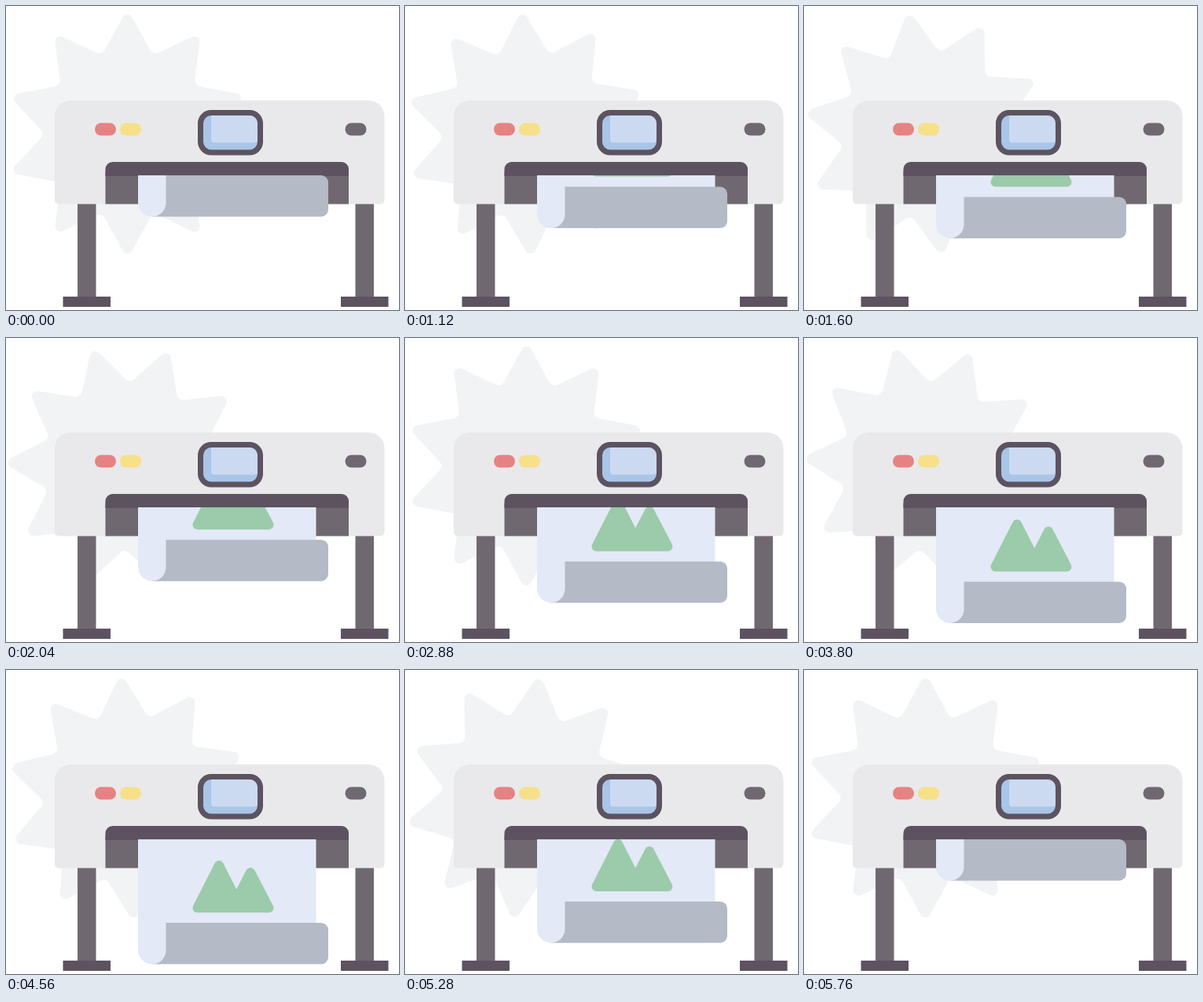
Animation of 500x386 px, one loop 5800 ms. Source, as an HTML page with a canvas:

```html
<!DOCTYPE html>
<html lang="en">
<head>
<meta charset="utf-8">
<title>Plotter</title>
<style>
  html, body { margin: 0; width: 100%; height: 100%; overflow: hidden; background: #fff; }
  canvas { display: block; }
</style>
</head>
<body>
<canvas id="stage" width="500" height="386"></canvas>
<script>
const ctx = document.getElementById('stage').getContext('2d');
const LOOP = 5800, TURN = 5760;
const RISE = 4833, DROP_START = 5140, DROP = 420, TRAVEL = 107;
const DARK = '#5d5360', GREY = '#706870', SHEET = '#e3e9f6';

function box(color, left, top, right, bottom, radii = 0) {
  ctx.fillStyle = color;
  ctx.beginPath();
  ctx.roundRect(left, top, right - left, bottom - top, radii);
  ctx.fill();
}

// Filled polygon with rounded corners; each point is [x, y, radius].
function roundedPoly(color, points) {
  const [a, b] = [points[points.length - 1], points[0]];
  ctx.fillStyle = color;
  ctx.beginPath();
  ctx.moveTo((a[0] + b[0]) / 2, (a[1] + b[1]) / 2);
  points.forEach(([x, y, r], i) => {
    const next = points[(i + 1) % points.length];
    ctx.arcTo(x, y, next[0], next[1], r);
  });
  ctx.closePath();
  ctx.fill();
}

const star = Array.from({ length: 20 }, (_, i) => {
  const angle = i * Math.PI / 10;
  const [dist, r] = i % 2 ? [105, 8] : [159.2, 7];
  return [dist * Math.sin(angle), -dist * Math.cos(angle), r];
});

const hills = [
  [233.7, 202, 6], [271, 128.8, 6], [293.2, 172.4, 0], [311, 138, 6], [344.3, 202, 6]
];

const clamp = v => Math.min(1, Math.max(0, v));
const ease = v => v * v * (3 - 2 * v);

function feed(t) {
  return TRAVEL * (ease(clamp(t / RISE)) - ease(clamp((t - DROP_START) / DROP)));
}

function drawStar(t) {
  ctx.save();
  ctx.translate(154.5, 162.5);
  ctx.rotate(2 * Math.PI * clamp(t / TURN));
  roundedPoly('#f2f3f5', star);
  ctx.restore();
}

function drawPrinter() {
  box(GREY, 91, 250, 114.5, 370);
  box(GREY, 444.5, 250, 468, 370);
  box(DARK, 72.5, 369, 133, 382);
  box(DARK, 426, 369, 486.5, 382);
  box('#e9e9eb', 62, 120, 481.5, 251.5, [20, 20, 5, 5]);

  box('#e68284', 113, 148.5, 140, 164.5, 8);
  box('#f6e089', 145, 148.5, 172, 164.5, 8);
  box(GREY, 431.5, 148.5, 458.5, 164.5, 8);

  box(DARK, 244, 132, 327, 189.5, 17);
  box('#a9c5e7', 251, 139, 320, 182.5, 10);
  box('#cbdaf1', 261, 139, 320, 173.5, [0, 10, 4, 4]);

  box(GREY, 126.5, 210, 436, 251.5);
  box(DARK, 126.5, 198, 436, 216, [9, 9, 0, 0]);
}

function drawPaper(d) {
  const top = 215, bottom = 267.5 + d;
  box(SHEET, 168, top, 394.5, top + d + 10);

  ctx.save();
  ctx.beginPath();
  ctx.rect(168, top, 240, 171);
  ctx.clip();
  ctx.translate(0, d);
  roundedPoly('#9bcbaa', hills);
  ctx.restore();

  box('#b4bac6', 186, top + d, 410, bottom, [0, 9, 9, 0]);
  box(SHEET, 168, top, 203.5, bottom, [0, 0, 17.5, 18]);
}

function frame(now) {
  let t = now % LOOP;
  if (t < 80) t = 0; // short rest before each cycle
  ctx.fillStyle = '#fff';
  ctx.fillRect(0, 0, 500, 386);
  drawStar(t);
  drawPrinter();
  drawPaper(feed(t));
}

const start = performance.now();
(function loop() {
  frame(performance.now() - start);
  requestAnimationFrame(loop);
})();
</script>
</body>
</html>
```
